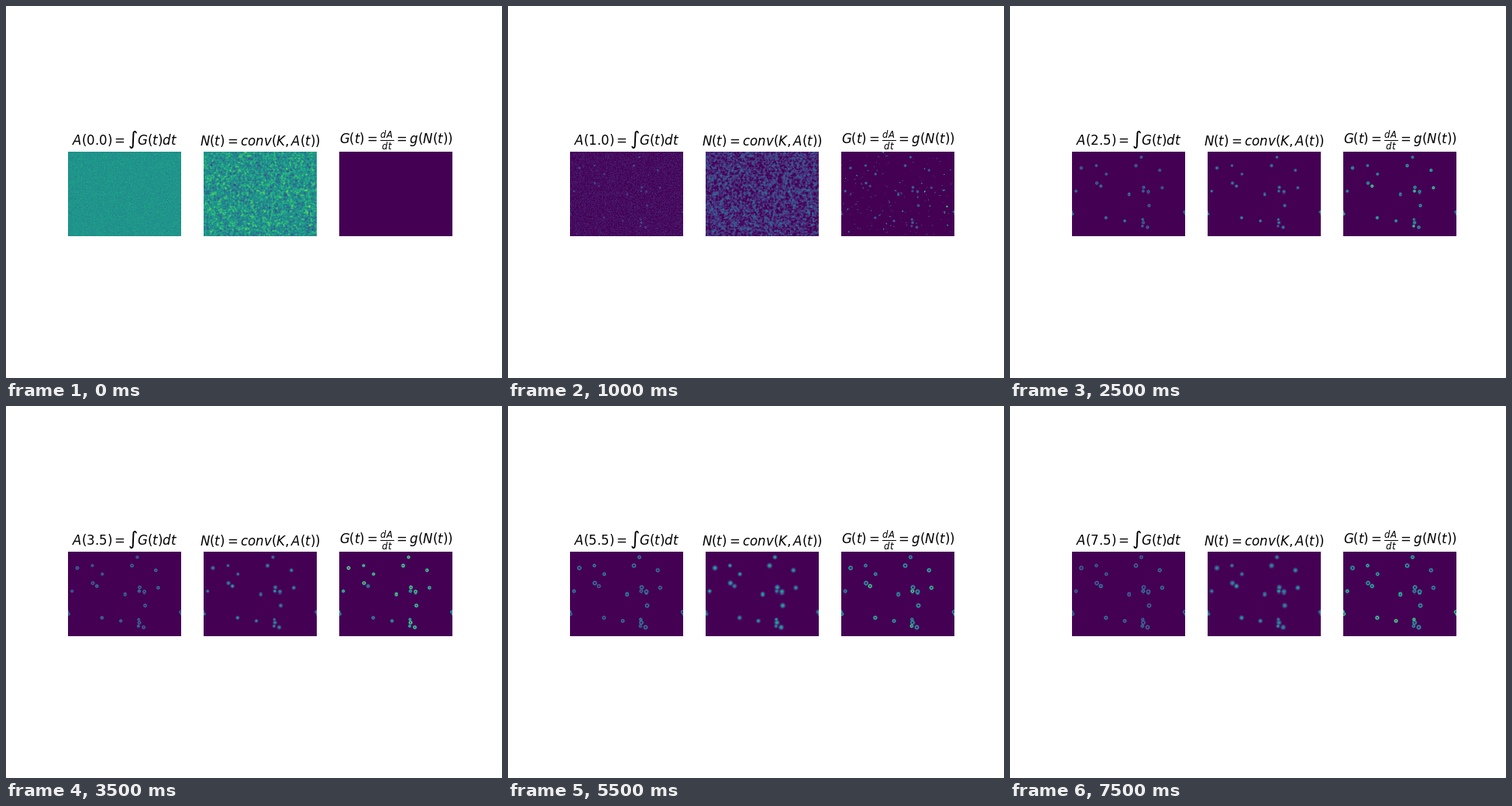
These frames come from a looping animation (640 by 480 pixels, 8 s). A matplotlib script:

```python
import numpy as np
import matplotlib.pyplot as plt
from matplotlib.animation import FuncAnimation

W, H = 146, 109
FRAMES, STEP = 16, 0.5
PIXEL = 0.72  # one pixel in points

rng = np.random.default_rng(7)

# the big cells stand at key points, the small ones are scattered
BIG = [(12, 22), (32, 41.5), (82.5, 19), (92.5, 47), (98.5, 52.5),
       (99.5, 69.5), (92, 91.5), (97.5, 97.5)]
SMALL = rng.uniform((0, 4), (W, H - 12), (15, 2))

yy, xx = np.mgrid[0:H, 0:W] + 0.5


def smooth(field, sigma):
    """Periodic Gaussian blur scaled back to unit spread."""
    fy = np.fft.fftfreq(H)[:, None]
    fx = np.fft.fftfreq(W)[None, :]
    kernel = np.exp(-2 * (np.pi * sigma) ** 2 * (fx ** 2 + fy ** 2))
    out = np.fft.ifft2(np.fft.fft2(field) * kernel).real
    return out / out.std()


def distance(x, y):
    """Distance to a point on the wrapped grid."""
    dx, dy = np.abs(xx - x), np.abs(yy - y)
    return np.hypot(np.minimum(dx, W - dx), np.minimum(dy, H - dy))


def bump(d, centre, width):
    return np.exp(-((d - centre) / width) ** 2)


grain = rng.normal(size=(H, W))
blobs = smooth(rng.normal(size=(H, W)), 0.75)
cells = [(distance(*p), 2.0, 0) for p in BIG]
cells += [(distance(*p), rng.uniform(1.1, 1.8), rng.uniform(0, 2 * np.pi))
          for p in SMALL]


def noise(t):
    """The random start, which sinks below zero and dies out."""
    a = 0.52 - 0.49 * t + 0.035 * grain
    n = 0.52 - 0.40 * t ** 3 + 0.09 * blobs
    g = 2.1 * t - 3.1 * t ** 2 + 0.5 * t ** 2 * blobs
    return a, n, g


def colony(t):
    """Growing rings for A and G, filled spots for N."""
    a, n, g = np.zeros((3, H, W))
    grow = 0.4 + 0.6 * np.clip((t - 1) / 4, 0, 1)
    born = np.clip(t - 0.5, 0, 1)
    for d, size, phase in cells:
        r = size * grow
        wave = np.sin(np.pi * t / 2 + phase)
        pulse = np.cos(2 * np.pi * (t - 6.5) / 3 + phase)
        a = np.maximum(a, born * (0.40 + 0.06 * wave) * bump(d, r, 0.8))
        n = np.maximum(n, born * (0.54 + 0.08 * wave) * bump(d, 0.3 * r, 0.8 * r + 0.4))
        g = np.maximum(g, born * (0.66 + 0.16 * pulse) * bump(d, r, 0.85))
    return a, n, g


fig, axes = plt.subplots(1, 3, figsize=(6.4, 4.8), dpi=100)
images = []
for ax in axes:
    images.append(ax.imshow(np.zeros((H, W)), cmap="viridis", vmin=0, vmax=1,
                            interpolation="nearest", extent=(0, 4, 3, 0)))
    ax.axis("off")
axes[1].set_title(r"$N(t) = conv(K, A(t))$", pad=6 - PIXEL)
axes[2].set_title(r"$G(t) = \frac{dA}{dt} = g(N(t))$", pad=6 + PIXEL)


def update(i):
    t = i * STEP
    for image, start, grown in zip(images, noise(t), colony(t)):
        image.set_data(np.maximum(start, grown))
    axes[0].set_title(rf"$A({t:.1f}) = \int G(t)dt$")
    return images


anim = FuncAnimation(fig, update, frames=FRAMES, interval=500,
                     repeat=True, repeat_delay=0, blit=False)
plt.show()
```
